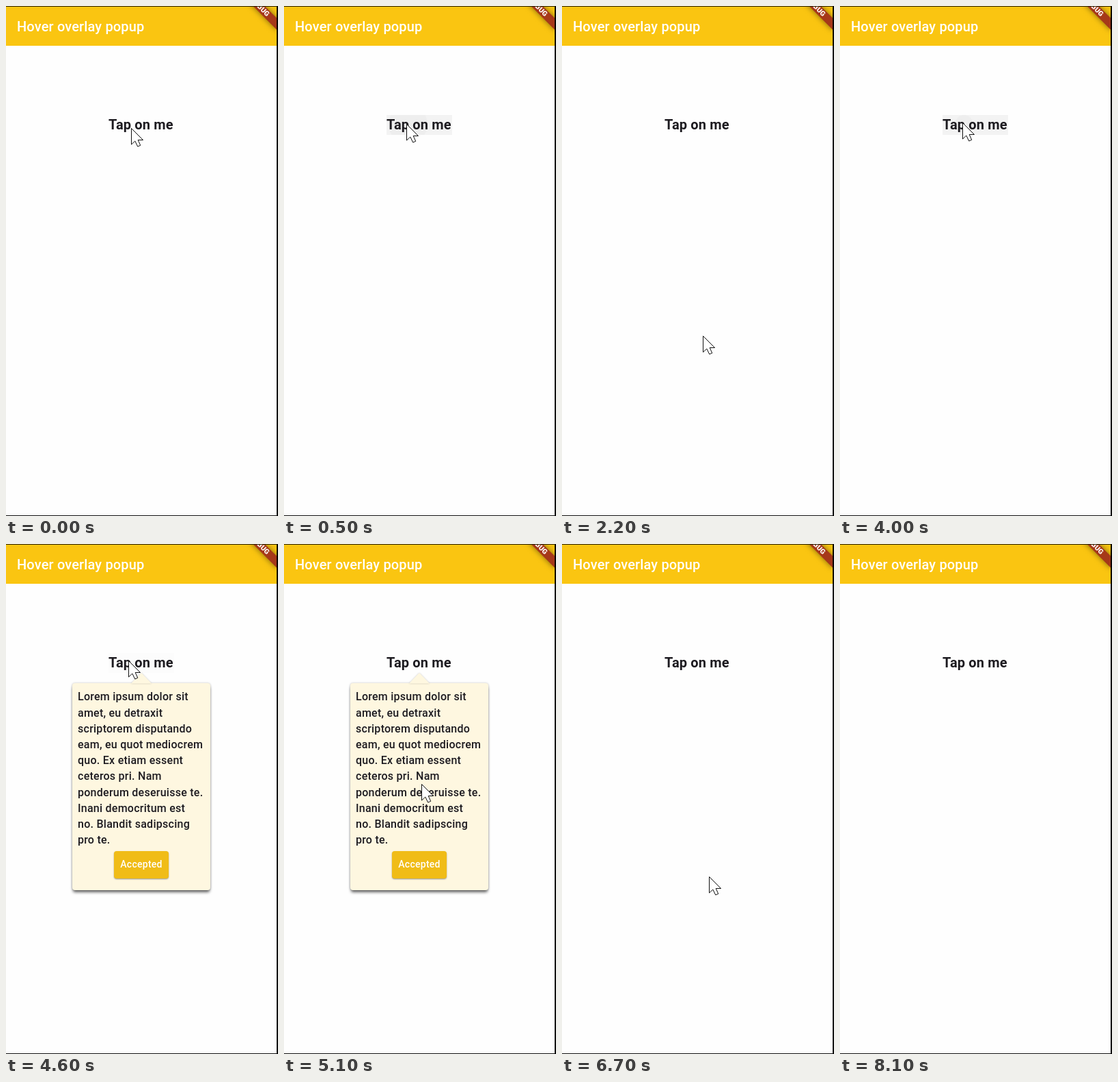
An HTML page that plays this animation: 398x744 px, repeating every 8.2 s.

```html
<!DOCTYPE html>
<html lang="en">
<head>
<meta charset="utf-8">
<title>Hover overlay popup</title>
<style>
  html, body { margin: 0; width: 100%; height: 100%; overflow: hidden; background: #fff; }
  #stage {
    position: relative; width: 398px; height: 744px; overflow: hidden; background: #fefefe;
    font-family: Roboto, sans-serif; font-weight: 500; letter-spacing: .25px; color: #1d1b20;
  }
  #stage div, svg { position: absolute; }
  #bar { left: 0; top: 0; width: 396px; height: 58px; background: #fac511; color: #fff; }
  #title {
    left: 16px; top: 15.5px; font-size: 20px; line-height: 29px;
    letter-spacing: .15px; white-space: nowrap;
  }
  /* Turns around the app's top right corner, above the visible area. */
  #banner {
    left: 356px; top: 6px; width: 80px; height: 12px;
    transform-origin: 40px -28px; transform: rotate(45deg);
    background: #a63819; box-shadow: 0 0 8px rgba(0, 0, 0, .5);
    color: #fff; font-size: 10.2px; font-weight: 900; line-height: 12px;
    letter-spacing: 0; text-align: center;
  }
  #frame {
    inset: 0; box-sizing: border-box; border: solid #000; border-width: 1px 2px 1px 0;
    border-top-color: #2a2106; border-bottom-color: #111;
  }
  #tap {
    left: 150px; top: 159px; width: 96px; height: 29px; overflow: hidden;
    font-size: 20px; font-weight: 700; line-height: 29px;
    letter-spacing: .15px; white-space: nowrap;
  }
  #glow { inset: 0; background: #f3f3f3; }
  #splash { border-radius: 50%; background: rgba(0, 0, 0, .02); }
  #label { left: 0; top: 0; }
  #card {
    left: 97px; top: 203px; width: 202px; height: 302px; border-radius: 4px; background: #fef7e0;
    box-shadow: 0 4px 4px -1px rgba(0, 0, 0, .6), 0 0 3px rgba(0, 0, 0, .25);
  }
  #arrow { left: 177px; top: 182px; filter: drop-shadow(0 0 1px rgba(0, 0, 0, .22)); }
  #text { left: 105px; top: 211.3px; font-size: 16px; line-height: 23.2px; white-space: nowrap; }
  #button {
    left: 158px; top: 447.5px; width: 80px; height: 40px; border-radius: 4px;
    background: #f0bc17; color: #fff; box-shadow: 0 1px 2px rgba(0, 0, 0, .4);
    font-size: 14px; line-height: 39.5px; text-align: center;
  }
  #cursor { left: 0; top: 0; overflow: visible; }
</style>
</head>
<body>
<div id="stage">
  <div id="bar"><div id="title">Hover overlay popup</div></div>
  <div id="banner">DEBUG</div>
  <div id="tap">
    <div id="glow"></div><div id="splash"></div>
    <div id="label">Tap on me</div>
  </div>
  <div id="popup">
    <div id="card"></div>
    <svg id="arrow" width="42" height="22"><path d="M6 21.5 L20 7 Q21 6 22 7 L36 21.5Z" fill="#fef7e0"/></svg>
    <div id="text">Lorem ipsum dolor sit<br>amet, eu detraxit<br>scriptorem disputando<br>eam, eu quot mediocrem<br>quo. Ex etiam essent<br>ceteros pri. Nam<br>ponderum deseruisse te.<br>Inani democritum est<br>no. Blandit sadipscing<br>pro te.</div>
    <div id="button">Accepted</div>
  </div>
  <svg id="cursor" width="20" height="30">
    <path d="M.5 .5V24L5.8 19L9.7 27L13.7 25.3L10.2 17.5H17.5Z" fill="#fff" stroke="#111"/>
  </svg>
  <div id="frame"></div>
</div>
<script>
const LOOP = 8200, STEP = 100;
const $ = id => document.getElementById(id);
const glow = $('glow'), splash = $('splash'), popup = $('popup'), cursor = $('cursor');

// Pointer stops: time, x, y
const stops = [
  [0, 183, 178], [400, 179, 172], [900, 179, 172], [1500, 220, 413], [1800, 207, 490],
  [2000, 206, 481], [2400, 206, 481], [2700, 209, 415], [3500, 179, 170],
  [4700, 179, 170], [5400, 217, 485], [5600, 216, 490], [5900, 215, 485], [6800, 215, 485]
];
const taps = [250, 3850];
const shows = [[750, 2000], [4350, 6050]];

const ramp = (t, a, b) => Math.min(1, Math.max(0, (t - a) / (b - a)));
const pulse = (t, a, b, rise, fall) => ramp(t, a, a + rise) * (1 - ramp(t, b, b + fall));

function pointer(t) {
  const i = stops.findIndex(s => s[0] > t);
  if (i < 0) return null;
  const [a, x, y] = stops[i - 1], [b, u, v] = stops[i];
  const k = ramp(t, a, b);
  return [x + (u - x) * k, y + (v - y) * k];
}

function draw(t) {
  const tap = t < taps[1] ? taps[0] : taps[1];
  const press = pulse(t, tap, tap + 400, 150, 400);
  const r = 6 + 90 * ramp(t, tap + 100, tap + 700);
  glow.style.opacity = press;
  splash.style.opacity = press;
  splash.style.left = 31 - r + 'px';
  splash.style.top = 13 - r + 'px';
  splash.style.width = splash.style.height = 2 * r + 'px';

  popup.style.opacity = Math.max(...shows.map(([a, b]) => pulse(t, a, b, 200, 180)));

  const p = pointer(t);
  cursor.style.display = p ? '' : 'none';
  if (p) cursor.style.transform = `translate(${Math.round(p[0])}px, ${Math.round(p[1])}px)`;
}

const start = performance.now();
function tick() {
  const t = (performance.now() - start) % LOOP;
  draw(Math.floor(t / STEP) * STEP);
  requestAnimationFrame(tick);
}
tick();
</script>
</body>
</html>
```
